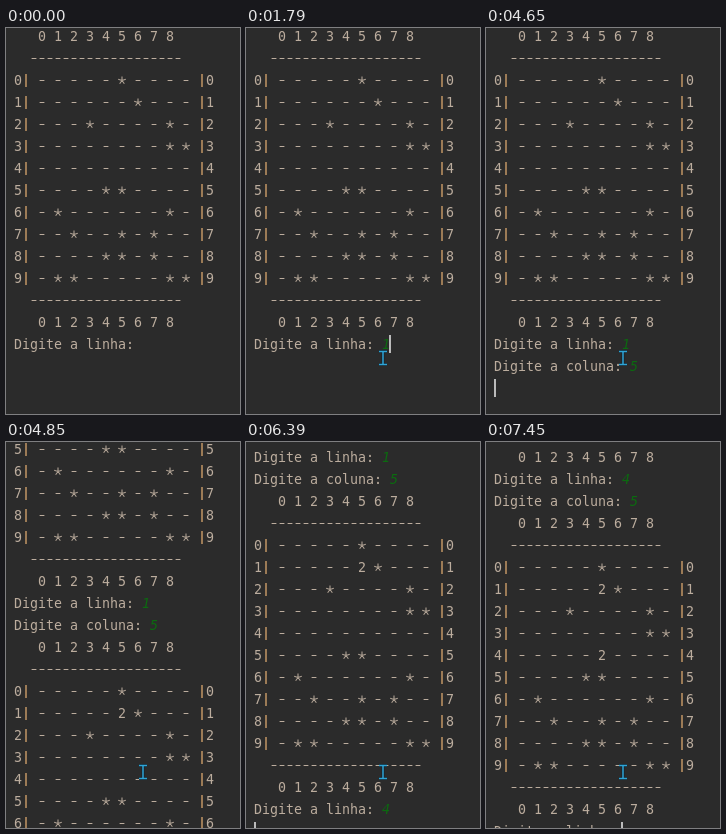
An HTML page with a canvas for the animation above (8000 ms loop, 234 px wide and 386 px high).

```html
<!DOCTYPE html>
<html lang="pt">
<head>
<meta charset="utf-8">
<title>Campo minado no console</title>
<style>
  html, body { margin: 0; width: 100%; height: 100%; overflow: hidden; background: #2b2b2b; }
  canvas { display: block; }
</style>
</head>
<body>
<canvas id="stage" width="234" height="386"></canvas>
<script>
const ctx = document.getElementById('stage').getContext('2d');
const LOOP = 8000, CELL = 8, LINE = 22, LEFT = 8;
const COLORS = { back: '#2b2b2b', text: '#bcad9e', star: '#b0a294', bar: '#b98f62', input: '#0c6a10', caret: '#bbbbbb', pointer: '#2fa4d6', outline: '#15232b' };
const FONT = '13.3px "DejaVu Sans Mono", monospace';

const FIELD = [
  '-----*----', '------*---', '---*----*-', '--------**', '----------',
  '----**----', '-*------*-', '--*--*-*--', '----**-*--', '-**-----**'
];
const LABELS = { 14: 'Digite a linha: ', 15: 'Digite a coluna: ', 30: 'Digite a linha: ', 31: 'Digite a coluna: ', 46: 'Digite a linha: ' };

// Console state: time, line, typed text (null: prompt not printed yet), caret visible
const CONSOLE = [
  [0, 14, '', false], [1330, 14, '', true], [1790, 14, '1', true], [2320, 14, '12', true],
  [3260, 14, '12', false], [3330, 14, '1', true], [3660, 15, null, true], [3860, 15, '', true],
  [4450, 15, '5', true], [4650, 16, null, true], [4850, 30, '', true], [5800, 30, '', false],
  [6060, 30, '4', true], [6390, 31, null, true], [6590, 31, '', true], [6850, 31, '5', true],
  [7120, 32, null, true], [7320, 46, '', true]
];
// Boards: time printed, first line, revealed cells as [row, column]
const BOARDS = [
  [0, 0, []],
  [4850, 16, [[1, 5]]],
  [7320, 32, [[1, 5], [4, 5]]]
];

const easeOut = p => 1 - (1 - p) ** 2;
const smoothstep = p => p * p * (3 - 2 * p);

function stepped(t, start, interval, index, last) {
  return Math.min(last, Math.floor((t - start) / interval) + index) / last;
}

function scrollAt(t) {
  if (t < 4850) return 0;
  if (t < 6390) return 279 * easeOut(stepped(t, 4850, 70, 1, 3));
  if (t < 7120) return 301;
  if (t < 7320) return 323;
  return 323 + 308 * easeOut(stepped(t, 7320, 65, 1, 3));
}

function drawStar(x, y) {
  ctx.strokeStyle = COLORS.star;
  ctx.lineWidth = 1.1;
  ctx.beginPath();
  for (let i = 0; i < 5; i++) {
    const a = -Math.PI / 2 + i * Math.PI * 2 / 5;
    ctx.moveTo(x, y);
    ctx.lineTo(x + 4 * Math.cos(a), y + 4 * Math.sin(a));
  }
  ctx.stroke();
}

function drawText(text, line, col = 0, typed = false) {
  const base = 13 + line * LINE;
  ctx.font = (typed ? 'italic ' : '') + FONT;
  [...text].forEach((ch, i) => {
    const x = LEFT + (col + i) * CELL;
    ctx.fillStyle = typed ? COLORS.input : ch === '|' ? COLORS.bar : COLORS.text;
    if (ch === '-') ctx.fillRect(x + 1.6, base - 5, 4.8, 1);
    else if (ch === '|') ctx.fillRect(x + 3.2, base - 11, 1.6, 13);
    else if (ch === '*') drawStar(x + 4, base - 4.5);
    else ctx.fillText(ch, x, base);
  });
}

function drawBoard(first, revealed) {
  const header = '   ' + [...'012345678'].join(' ');
  const rule = '  ' + '-'.repeat(19);
  const rows = FIELD.map((marks, r) => {
    const cells = [...marks];
    for (const [row, col] of revealed) if (row === r) cells[col] = '2';
    return `${r}| ${cells.join(' ')} |${r}`;
  });
  [header, rule, ...rows, rule, header].forEach((text, i) => drawText(text, first + i));
}

function drawConsole(t) {
  const past = CONSOLE.filter(step => step[0] <= t);
  const typed = {};
  for (const [, line, input] of past) if (input !== null) typed[line] = input;
  for (const line in typed) {
    drawText(LABELS[line], +line);
    drawText(typed[line], +line, LABELS[line].length, true);
  }
  const [, line, input, visible] = past[past.length - 1];
  if (!visible) return;
  const col = input === null ? 0 : LABELS[line].length + input.length;
  ctx.fillStyle = COLORS.caret;
  ctx.fillRect(col ? LEFT - 1 + col * CELL : LEFT, line * LINE - 1, 2, 18);
}

function drawPointer(t) {
  if (t < 770) return;
  const p = smoothstep(stepped(t, 770, 68, 0, 5));
  const x = Math.round(229 - 92 * p), y = Math.round(277 + 53 * p);
  if (t >= 1260 && t < 1330) {
    ctx.fillStyle = 'rgba(255, 255, 0, 0.47)';
    ctx.beginPath();
    ctx.arc(x, y, 12, 0, 2 * Math.PI);
    ctx.fill();
  }
  const beam = new Path2D();
  for (const side of [-1, 1]) {
    beam.moveTo(x - 4, y + side * 6.5);
    beam.lineTo(x + 4, y + side * 6.5);
  }
  beam.moveTo(x, y - 6.5);
  beam.lineTo(x, y + 6.5);
  for (const [width, color] of [[3, COLORS.outline], [1.5, COLORS.pointer]]) {
    ctx.lineWidth = width;
    ctx.strokeStyle = color;
    ctx.stroke(beam);
  }
}

function draw(now) {
  const t = now % LOOP;
  ctx.fillStyle = COLORS.back;
  ctx.fillRect(0, 0, 234, 386);
  ctx.save();
  ctx.translate(0, -Math.round(scrollAt(t)));
  for (const [time, first, revealed] of BOARDS) if (t >= time) drawBoard(first, revealed);
  drawConsole(t);
  ctx.restore();
  drawPointer(t);
  requestAnimationFrame(draw);
}

draw(performance.now());
</script>
</body>
</html>
```
